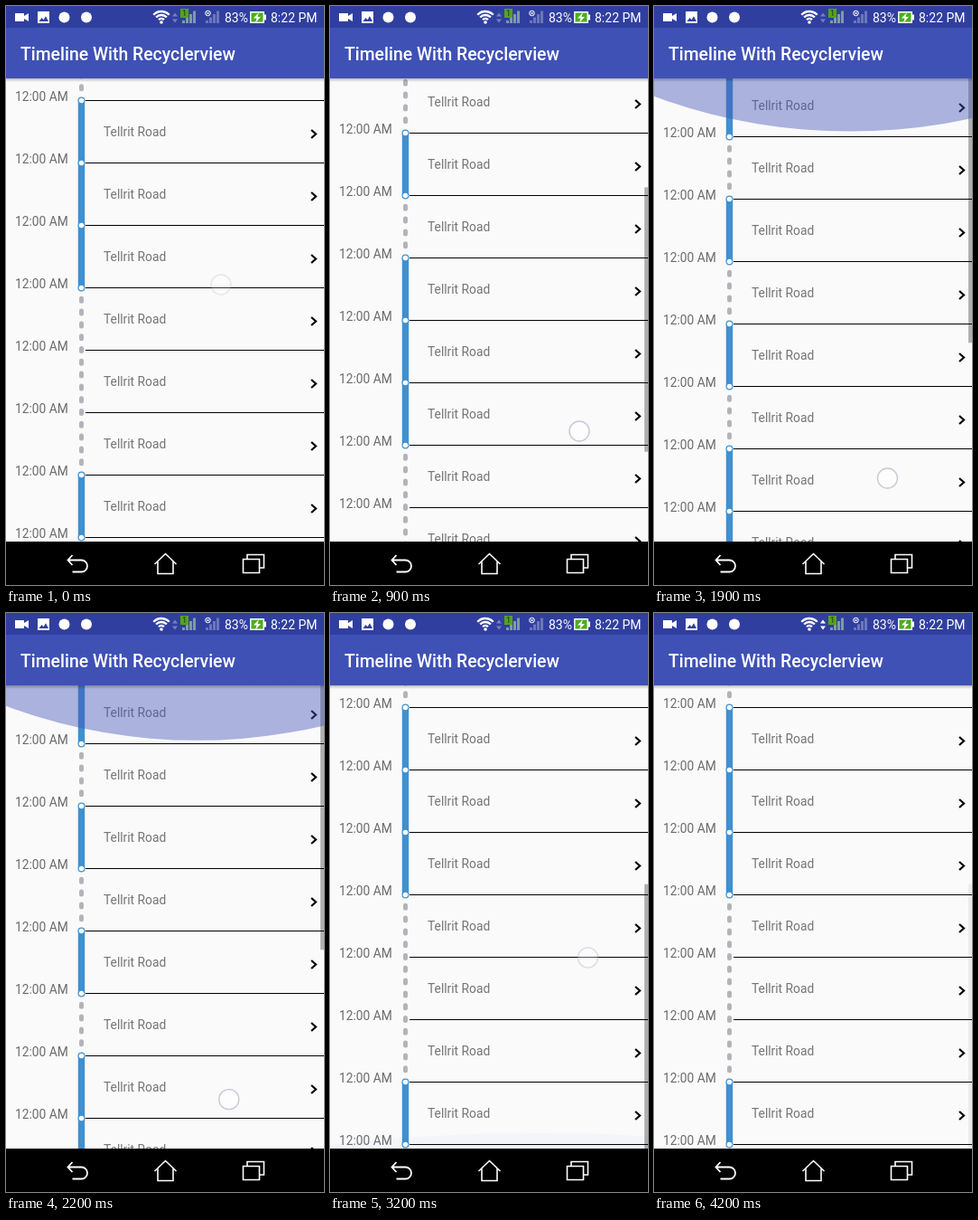
Write an HTML page with a canvas that moves like this. It is 352 px wide and 640 px high and loops after 4.3 s.

```html
<!DOCTYPE html>
<html>
<head>
<meta charset="utf-8">
<style>
html, body { margin: 0; width: 100%; height: 100%; overflow: hidden; background: #000; }
canvas { display: block; }
</style>
</head>
<body>
<canvas id="stage" width="352" height="640"></canvas>
<script>
const ctx = document.getElementById('stage').getContext('2d');
const LOOP = 4300, STEP = 100, WIDTH = 352;
const TOP = 80, BOTTOM = 592, VIEW = BOTTOM - TOP;
const ROW = 69, FIRST_LINE = 144, MAX_SCROLL = 385;
const SEGMENTS = [...'BGBGBGBBBGGGB']; // B: solid blue, G: grey dashes
const BLUE = '#3f90d0', GREY = '#b3b3ba';

// Finger strokes; pull names the list end that glows under an overscroll.
const GESTURES = [
  { start: 0, end: 900, from: [238, 308], to: [276, 470] },
  { start: 1320, end: 2400, from: [281, 492], to: [239, 548], pull: 'top' },
  { start: 2500, end: 2700, from: [245, 538], to: [248, 308] },
  { start: 3170, end: 3600, from: [285, 390], to: [291, 259], pull: 'bottom' },
];

const clamp = v => Math.min(1, Math.max(0, v));
const progress = (t, start, end) => clamp((t - start) / (end - start));

function scrollAt(t) {
  return t < 2400
    ? MAX_SCROLL * (1 - progress(t, 0, 1300) ** 2.16)
    : MAX_SCROLL * (1 - (1 - progress(t, 2400, 3000)) ** 1.69);
}

function touchPoint({ start, end, from, to }, t) {
  const f = progress(t, start, end);
  return from.map((v, i) => v + (to[i] - v) * f);
}

function rect(color, x, y, w, h) {
  ctx.fillStyle = color;
  ctx.fillRect(x, y, w, h);
}

function text(str, x, y, font, color) {
  ctx.font = font + ' Roboto, sans-serif';
  ctx.fillStyle = color;
  ctx.fillText(str, x, y);
}

function disc(x, y, r, color, ry = r) {
  ctx.beginPath();
  ctx.ellipse(x, y, r, ry, 0, 0, 7);
  ctx.fillStyle = color;
  ctx.fill();
}

function arc(x, y, r, from, to, color, width) {
  ctx.beginPath();
  ctx.arc(x, y, r, from, to);
  ctx.strokeStyle = color;
  ctx.lineWidth = width;
  ctx.stroke();
}

function stroke(d, color, width) {
  ctx.strokeStyle = color;
  ctx.lineWidth = width;
  ctx.stroke(new Path2D(d));
}

function fill(d, color) {
  ctx.fillStyle = color;
  ctx.fill(new Path2D(d));
}

function drawRows(scroll) {
  const lineY = i => FIRST_LINE + i * ROW - Math.round(scroll);
  SEGMENTS.forEach((kind, i) => {
    const y = lineY(i);
    if (kind === 'B') {
      rect(BLUE, 79.8, y - ROW, 7.4, ROW);
    } else {
      ctx.lineCap = 'round';
      for (let k = 1; k <= 5; k++) {
        const dot = y - ROW + k * ROW / 5;
        if (k < 5 || SEGMENTS[i + 1] === 'G') stroke(`M83.5 ${dot - 1.5}v3`, GREY, 5);
      }
      ctx.lineCap = 'butt';
    }
    rect('#000', 88, y, 264, 1);
    text('Tellrit Road', 108, y - 29, '13.8px', '#757575');
    text('12:00 AM', 10, y + 1, '13.8px', '#6c6c6c');
    stroke(`M338 ${y - 36}l5 4.5l-5 4.5`, '#000', 2.2);
  });
  SEGMENTS.forEach((kind, i) => {
    if (kind === 'G' && SEGMENTS[i + 1] !== 'B') return;
    disc(83.5, lineY(i) + .5, 4, BLUE);
    disc(83.5, lineY(i) + .5, 2.8, '#fff');
  });
}

function drawScrollbar(t, scroll) {
  const ratio = VIEW / (VIEW + MAX_SCROLL);
  const alpha = .3 * clamp(t / 100) * clamp((LOOP - t) / 500);
  rect(`rgba(0,0,0,${alpha})`, 348, TOP + scroll * ratio, 4, VIEW * ratio);
}

function drawGlow(gesture, t) {
  const { start, end, pull } = gesture;
  const release = 1 - progress(t, end, end + 350);
  const force = .118 * (Math.min(t, end) - start) * release;
  if (!pull || force <= 2.1) return;
  const radius = WIDTH * 1.5, height = radius * (1 - Math.cos(Math.PI / 6));
  const scale = (.7 - 1 / Math.sqrt(force)) / .7;
  const centerX = (WIDTH / 2 + touchPoint(gesture, t)[0]) / 2;
  const offset = (height - radius) * scale;
  const centerY = pull === 'top' ? TOP + offset : BOTTOM - offset;
  const alpha = Math.min(.43, force * .0083);
  disc(centerX, centerY, radius, `rgba(63,81,181,${alpha})`, radius * scale);
}

function drawTouch(gesture, t) {
  const { start, end } = gesture;
  if (t < start || t > end + 120) return;
  const [x, y] = touchPoint(gesture, t);
  ctx.globalAlpha = Math.min(.4 + .6 * progress(t, start, start + 80), 1 - progress(t, end, end + 120));
  disc(x, y, 11, 'rgba(255,255,255,.5)');
  arc(x, y, 11, 0, 7, 'rgba(125,125,170,.4)', 1.4);
  ctx.globalAlpha = 1;
}

function drawSignal(x, color) {
  for (let k = 0; k < 4; k++) rect(color, x + k * 4, 16 - k * 3.5, 3, 3 + k * 3.5);
}

function drawStatusBar(t) {
  rect('#303f9f', 0, 0, WIDTH, 24);
  fill('M10 8h10v3l5-3v9l-5-3v3h-10z', '#fff');
  rect('#fff', 35, 6, 13, 13);
  fill('M36.5 17l3-4l2 2.3l2.5-4l3 5.7z', '#303f9f');
  disc(64.5, 12.5, 6, '#fff');
  disc(89, 12.5, 6, '#fff');

  for (let r = 4; r <= 12; r += 4) arc(172, 18, r, -Math.PI * .76, -Math.PI * .24, '#fff', 2.3);
  disc(172, 18, 1.8, '#fff');
  fill('M184 11.5l3-4l3 4zM184 14.5h6l-3 4z', t >= 3700 ? '#fff' : '#7680bd');

  drawSignal(195, '#7f9aa5');
  rect('#55a31b', 193, 3, 9, 10);
  text('1', 195, 11, '9px', '#22331a');
  drawSignal(221, '#6c77ba');
  arc(223.5, 8, 2.8, 0, 7, '#fff', 1);
  stroke('M222 6.5l3 3m0-3l-3 3', '#fff', 1);

  text('83%', 242, 18, '14px', '#fff');
  rect('#fff', 270, 6, 16, 13);
  rect('#fff', 286, 9.5, 2, 6);
  rect('#4caf1a', 271.5, 7.5, 13, 10);
  fill('M280 7l-6 6.5h3.5l-1.5 5l6-6.5h-3.5z', '#fff');
  text('8:22 PM', 293, 18, '14px', '#fff');
}

function drawToolbar() {
  const shadow = ctx.createLinearGradient(0, TOP, 0, TOP + 4);
  shadow.addColorStop(0, 'rgba(0,0,0,.25)');
  shadow.addColorStop(1, 'rgba(0,0,0,0)');
  rect(shadow, 0, TOP, WIDTH, 4);
  rect('#3f51b5', 0, 24, WIDTH, TOP - 24);
  text('Timeline With Recyclerview', 16, 60, '500 19.4px', '#fff');
}

function drawNavBar() {
  rect('#000', 0, BOTTOM, WIDTH, 48);
  stroke('M73.5 607l-5 5.5l5 5.5M69 612.5h14.5a6.5 6.5 0 0 1 0 13h-10', '#fff', 1.8);
  stroke('M164.5 617l12-11.5l12 11.5M168 614v13.5h17v-13.5', '#fff', 1.6);
  stroke('M262.5 611.5h18v15h-18zM267 611v-4.5h18.5v14.5h-4.5', '#fff', 1.6);
}

function draw(now) {
  const t = Math.floor(now % LOOP / STEP) * STEP;
  const scroll = scrollAt(t);
  rect('#fafafa', 0, 0, WIDTH, 640);

  ctx.save();
  ctx.beginPath();
  ctx.rect(0, TOP, WIDTH, VIEW);
  ctx.clip();
  drawRows(scroll);
  drawScrollbar(t, scroll);
  GESTURES.forEach(g => drawGlow(g, t));
  ctx.restore();

  drawToolbar();
  drawStatusBar(t);
  drawNavBar();
  GESTURES.forEach(g => drawTouch(g, t));
}

function loop() {
  draw(performance.now());
  requestAnimationFrame(loop);
}
loop();
</script>
</body>
</html>
```
